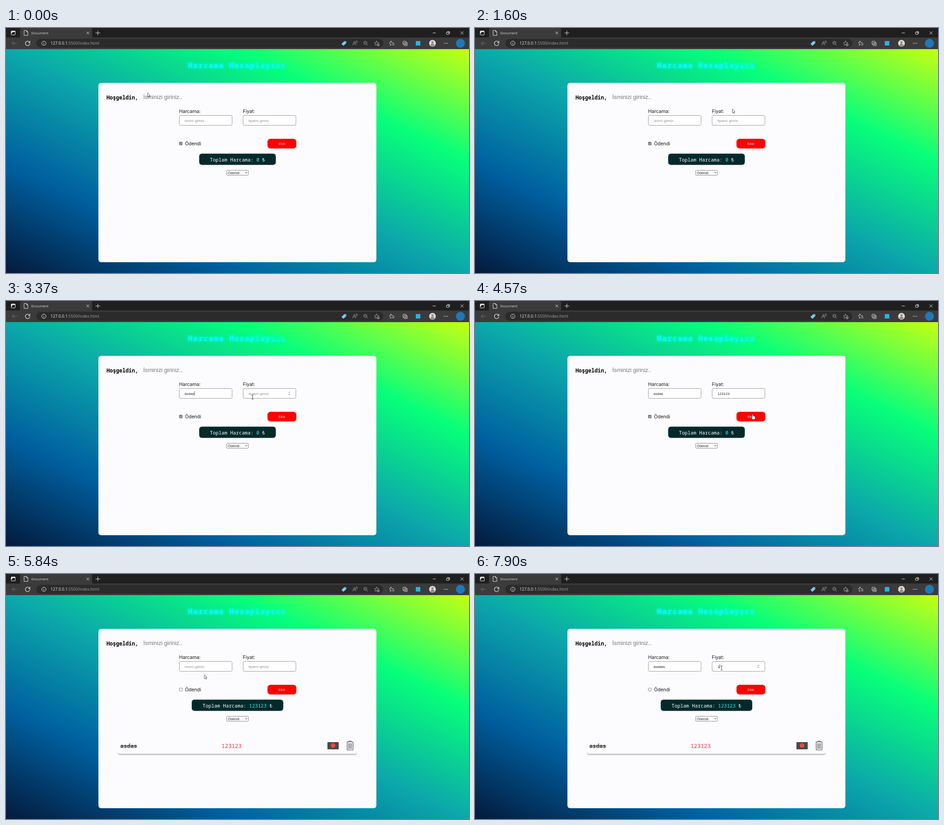
Animation, 1027 px wide and 545 px high, one loop 8 s. Source, as an HTML page:

```html
<!DOCTYPE html>
<html lang="tr">
<head>
<meta charset="utf-8">
<title>Document</title>
<style>
html, body { margin: 0; width: 100%; height: 100%; overflow: hidden; background: #3b3b3b; }
#page { position: absolute; left: 0; top: 47px; width: 1027px; height: 498px;
  background: linear-gradient(to right top, #041a3c, #0060a0, #0ca8aa, #08ff7a, #c6ff12); }
svg { position: absolute; left: 0; top: 0; }
text { white-space: pre; }
.ui { font-family: "Open Sans", sans-serif; }
.mono { font-family: "Noto Sans Mono", "DejaVu Sans Mono", monospace; }
.label { font: 10.5px Inter, sans-serif; fill: #151515; }
.field { font: 8px "Liberation Sans", Arial, sans-serif; fill: #222; }
.hint { fill: #8d8d8d; }
.line { fill: none; stroke: #e4e4e4; stroke-linecap: round; stroke-linejoin: round; }
.title { font-size: 16px; font-weight: 700; letter-spacing: 1.85px; fill: #10f6f6;
  text-shadow: 0 0 5px #0ff, 0 0 12px #0ffa; }
#row rect.base { filter: drop-shadow(0 2px 1.5px #0005); }
</style>
</head>
<body>
<div id="page"></div>
<svg width="1027" height="545" viewBox="0 0 1027 545">
  <!-- Browser window -->
  <path fill="#1f1f1f" d="M0 0H1027V21H0Z"/>
  <path fill="#3b3b3b" d="M0 21.5H1027V47H0ZM31 22V4q0-4 4-4H187q4 0 4 4V22Z"/>
  <rect x="67" y="24" width="770" height="20" rx="10" fill="#2b2b2b"/>
  <g class="line">
    <rect x="11.5" y="6.5" width="9" height="9" rx="1.5"/>
    <path stroke-width="2" d="M12 8H20M13 8V11"/>
    <path d="M40.5 5.5H45.500L48.500 8.500V16.500H40.500ZM45.500 5.500V8.500H48.500"/>
    <path d="M179 8.500L184 13.500M184 8.500L179 13.500M199 11H208.500M203.700 6.500V15.500"/>
    <path d="M947 11H953M977.500 9.500H982.500V14H977.500ZM979 8H984V12.500M1008.500 8L1014.500 14M1014.500 8L1008.500 14"/>
    <path stroke="#777" d="M23.500 34H13.500L18 29.500M13.500 34L18 38.500"/>
    <path stroke-width="1.2" d="M52.500 32A5 5 0 1 0 53 34.500M53 29V32.500H49.500"/>
    <circle cx="84" cy="34" r="4.800"/><path d="M84 33.500V36.500M84 31.500V31.600"/>
  </g>
  <g class="line" stroke-width=".9">
    <g style="stroke:#aaa">
      <path d="M769 38L772.500 29.500L776 38M770.500 35H774.500M776 29q2 2 0 4M778 28q3 3 0 6"/>
      <circle cx="797" cy="33" r="3.500"/><path d="M795.500 33H798.500M799.500 35.500L802 38.500"/>
      <path id="star" d="M822 29L823.500 32.300L827 32.700L824.400 35L825.200 38.500L822 36.700L818.800 38.500L819.600 35L817 32.700L820.500 32.300Z"/>
      <circle cx="825.500" cy="37.500" r="2.700" fill="#2b2b2b"/><path d="M824 37.500H827M825.500 36V39"/>
    </g>
    <path d="M854 29L855.300 32.300L859 32.700M853.500 29L852.200 32.300L850.500 32.800L853 35L852.200 38.500L855 37M858 34.800H861M857 37.500H861"/>
    <rect x="880.500" y="29.500" width="7" height="7" rx="1.5"/>
    <path fill="#3b3b3b" d="M883.500 32.500H890V39H883.500ZM886.700 34V37.500M885 35.700H888.500"/>
  </g>
  <g fill="#ddd"><circle cx="972.500" cy="34" r=".9"/><circle cx="976" cy="34" r=".9"/><circle cx="979.500" cy="34" r=".9"/></g>
  <path fill="#7cc8f4" d="M750 29.500L754.500 29L755 33.500L748.500 39.500L744 35.500Z"/>
  <circle cx="753" cy="31" r=".8" fill="#24506e"/>
  <rect x="909" y="29" width="10" height="10" fill="#28b4e4"/>
  <circle cx="946" cy="34" r="7.500" fill="#dedbd8"/>
  <circle cx="946" cy="32" r="2.500" fill="#8c8785"/>
  <path fill="#8c8785" d="M941.500 39q0-4 4.500-4t4.500 4q-4.500 3-9 0Z"/>
  <circle cx="1008" cy="34" r="10" fill="#1f78b8"/>
  <g class="ui">
    <text x="56" y="14" font-size="7.800" fill="#ddd">Document</text>
    <text x="99" y="37.300" font-size="8.900" fill="#eee">127.0.0.1<tspan fill="#a2a2a2">:5500/index.html</tspan></text>
  </g>

  <!-- Web page -->
  <text class="mono title" x="404" y="89">Harcama Hesaplayıcı</text>
  <rect x="205" y="122" width="616.500" height="399" rx="6" fill="#fcfcfe"/>
  <text class="mono" x="223" y="158.500" font-size="11.700" font-weight="700">Hoşgeldin,</text>
  <text class="field hint" x="304.500" y="158" style="font-size:12.800px;fill:#777">İsminizi giriniz..</text>
  <text class="label" x="384" y="189">Harcama:</text>
  <text class="label" x="525.500" y="189">Fiyat:</text>
  <g fill="#fff" stroke="#999">
    <rect x="384.500" y="194.500" width="117" height="22" rx="3"/>
    <rect x="526" y="194.500" width="117" height="22" rx="3"/>
  </g>
  <g id="item">
    <text class="field hint" x="396" y="208.500">ürünü giriniz..</text>
    <text class="field" x="396" y="208.500"></text><path stroke="#111" stroke-width=".8" d="M0 201V210"/>
  </g>
  <g id="price">
    <text class="field hint" x="538" y="208.500" style="font-size:7.700px">fiyatını giriniz</text>
    <text class="field" x="538" y="208.500"></text><path stroke="#111" stroke-width=".8" d="M0 201V210"/>
  </g>
  <path id="spin" fill="#777" d="M626.300 204L628 202L629.700 204ZM626.300 207L628 209L629.700 207Z"/>
  <rect id="box" x="384.500" y="253.800" width="6.500" height="6.500" rx="1" stroke="#77776f" stroke-width=".9"/>
  <path id="tick" fill="none" stroke="#fff" d="M385.800 257.200L387.200 258.700L389.900 255.300"/>
  <text class="label" x="397" y="260.700">Ödendi</text>
  <rect x="580" y="246.500" width="64" height="21.500" rx="6.500" fill="#f00"/>
  <text class="field" x="612" y="260.300" text-anchor="middle" style="fill:#ffd9d9">Ekle</text>
  <rect id="pill" y="279.500" height="25" rx="6" fill="#03292a"/>
  <text class="mono" x="513.500" y="297" font-size="10.750" text-anchor="middle" fill="#fff">Toplam Harcama: <tspan id="sum" fill="#3fe9f5"></tspan> ₺</text>
  <rect x="489.500" y="316.500" width="48" height="11" rx="1" fill="#fff" stroke="#858585"/>
  <text class="field" x="492" y="325">Ödendi</text>
  <path fill="none" stroke="#222" d="M531 320.800L533 323L535 320.800"/>

  <g id="row">
    <rect class="base" x="249" y="372" width="528" height="28" rx="4" fill="#fcfcfe"/>
    <rect x="246" y="362" width="534" height="35" fill="#fcfcfe"/>
    <g class="mono" font-size="12.450">
      <text x="253.500" y="387" font-weight="700" fill="#444" text-decoration="line-through">asdas</text>
      <text x="478" y="387" font-weight="500" fill="#ee3048">123123</text>
    </g>
    <rect x="713" y="374" width="25" height="16" rx="1" fill="#4a4a4a"/>
    <circle cx="725.500" cy="381.500" r="5" fill="#ee4a3c"/>
    <path fill="none" stroke="#444" stroke-width="1.200" d="M756 373.500H770M760.500 373V371.500H765.500V373M756.800 374V390.500q0 1 1 1H768.700q1 0 1-1V374M760.300 376.500V389M763.200 376.500V389M766.200 376.500V389"/>
  </g>

  <g id="mouse">
    <path fill="#fff" stroke="#333" stroke-width=".8" d="M0 0V9L2 7.300L3.500 10.300L4.800 9.700L3.500 6.700H6Z"/>
    <path fill="none" stroke="#333" stroke-width=".9" d="M-2-4.500H-.6L0-4L.6-4.500H2M0-4V4M-2 4.500H-.6L0 4L.6 4.500H2"/>
    <path fill="#fff" stroke="#222" stroke-width=".7" d="M-1 .8Q0-.8 1 .8V4Q2 3.300 2.600 4.300Q3.700 3.600 4.200 4.800Q5.400 4.300 5.500 5.800V8.500Q5 10 4.300 11.500H-.5Q-1.500 9-3.200 7.200Q-2.800 5.800-1 7.200Z"/>
  </g>
</svg>
<script>
const LOOP = 8000, ADDED = 4630;
const ARROW = 0, BEAM = 1, HAND = 2;
const $ = id => document.getElementById(id);
const show = (el, on) => el.style.display = on ? "" : "none";

// Pointer steps: time, x, y, shape
const path = [
  [0, 314, 144, ARROW], [730, 307, 158, ARROW], [770, 299, 174, ARROW], [800, 292, 189, ARROW],
  [830, 288, 199, ARROW], [870, 284, 207, ARROW], [900, 282, 212, ARROW],
  [1600, 571, 180, ARROW], [1700, 520, 187, ARROW], [2030, 456, 208, BEAM],
  [3370, 547, 214, BEAM], [3430, 547, 209, BEAM],
  [4500, 575, 225, ARROW], [4530, 600, 240, ARROW], [4570, 616, 252, HAND],
  [5240, 520, 253, ARROW], [5270, 440, 254, ARROW], [5300, 388, 254, ARROW],
  [5740, 402, 246, ARROW], [5770, 418, 237, ARROW], [5810, 432, 229, ARROW], [5840, 440, 224, ARROW],
  [6100, 456, 207, BEAM], [7340, 490, 207, BEAM], [7390, 525, 208, BEAM], [7440, 547, 209, BEAM]
];
const keys = {
  item: [["asdas", i => i ? 2670 + (i - 1) * 165 : 2530], ["asdads", i => 6670 + i * 80]],
  price: [["123123", i => i ? 3930 + (i - 1) * 85 : 3770], ["1", () => 7900]]
};

function drawField(id, t, caretOn) {
  const [word, at] = keys[id][t < ADDED ? 0 : 1];
  const value = [...word].filter((c, i) => t >= at(i)).join("");
  const [hint, text, caret] = $(id).children;
  text.textContent = value;
  show(hint, !value);
  show(caret, caretOn);
  const x = +text.getAttribute("x") + (value ? text.getComputedTextLength() : 0) + .5;
  caret.setAttribute("transform", `translate(${x})`);
}

function draw(t) {
  const within = (a, b) => t >= a && t < b;
  const added = t >= ADDED, checked = t < 5470;
  drawField("item", t, within(2130, 3530) || within(6200, 7670));
  drawField("price", t, within(3530, 4500) || t >= 7740);
  show($("spin"), within(3370, 4500) || t >= 7440);
  show($("tick"), checked);
  $("box").setAttribute("fill", checked ? "#77776f" : "#fff");
  show($("row"), added);
  $("sum").textContent = added ? "123123" : "0";
  $("pill").setAttribute("x", added ? 412 : 428.5);
  $("pill").setAttribute("width", added ? 203 : 170);

  const [, x, y, shape] = path.findLast(p => p[0] <= t);
  $("mouse").setAttribute("transform", `translate(${x} ${y})`);
  [...$("mouse").children].forEach((el, i) => show(el, i === shape));
}

const start = performance.now();
function tick() {
  draw((performance.now() - start) % LOOP);
  requestAnimationFrame(tick);
}
tick();
</script>
</body>
</html>
```
